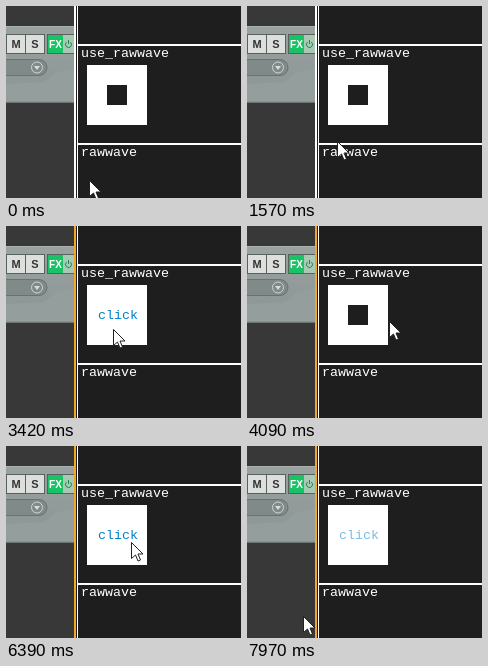
An HTML page with a canvas for the animation above (7.99 s loop, 235 by 192 pixels).

```html
<!DOCTYPE html>
<html lang="en">
<head>
<meta charset="utf-8">
<title>Toggle button</title>
<style>
  html, body { margin: 0; width: 235px; height: 192px; overflow: hidden; background: #1e1e1e; }
  canvas { display: block; }
</style>
</head>
<body>
<canvas id="stage" width="235" height="192"></canvas>
<script>
const ctx = document.getElementById('stage').getContext('2d');
const LOOP = 7990, DARK = '#1e1e1e', BLUE = [0, 128, 200];
const MONO = '13.33px "Liberation Mono", monospace';
const SANS = '"Liberation Sans", sans-serif';

// Pointer tip: time, x, y
const path = [
  [30, 83, 174], [430, 136, 110], [1110, 136, 110], [1570, 90, 135], [1670, 90, 135],
  [1900, 90, 141], [2100, 107, 103], [3440, 107, 103], [3760, 176, 97], [3880, 176, 97],
  [4210, 128, 94], [4930, 128, 94], [5210, 180, 105], [5390, 180, 105], [5810, 125, 96],
  [6700, 125, 96], [7050, 176, 93], [7250, 176, 92], [7460, 161, 92], [7560, 161, 92],
  [7970, 56, 170]
];
const enters = [390, 1950, 4230, 5620, 7620];
const leaves = [1230, 3540, 5000, 6790, 7885];
const clicks = [2390, 3070, 4670, 6230];
const holds = [[470, 570], [1570, 1670]];

const clamp = v => Math.max(0, Math.min(1, v));
const mix = (a, b, k) => a + (b - a) * k;
const blend = (a, b, k) => `rgb(${a.map((v, i) => Math.round(mix(v, b[i], k)))})`;
const last = (times, t) => times.filter(v => v <= t).pop() ?? -1e4;

function rect(x, y, w, h, color) {
  ctx.fillStyle = color;
  ctx.fillRect(x, y, w, h);
}

function text(s, x, y, color, font = MONO, align = 'left') {
  ctx.font = font;
  ctx.textAlign = align;
  ctx.fillStyle = color;
  ctx.fillText(s, x, y);
}

function shape(points, fill) {
  ctx.beginPath();
  points.forEach(([x, y]) => ctx.lineTo(x, y));
  ctx.closePath();
  ctx.fillStyle = fill;
  ctx.fill();
}

function centred(size, color, hole = 0) {
  ctx.beginPath();
  for (const s of [size, Math.min(hole, size)]) ctx.rect(111 - s / 2, 89 - s / 2, s, s);
  ctx.fillStyle = color;
  ctx.fill('evenodd');
}

function pointer(t) {
  let i = path.findIndex(k => k[0] > t);
  if (i < 1) return path[i < 0 ? path.length - 1 : 0].slice(1);
  const [a, b] = [path[i - 1], path[i]];
  const k = clamp((t - a[0]) / (b[0] - a[0])), e = k * k * (3 - 2 * k);
  return [mix(a[1], b[1], e), mix(a[2], b[2], e)];
}

function trackPanel() {
  rect(0, 0, 68, 192, '#383838');
  const g = ctx.createLinearGradient(0, 20, 0, 97);
  g.addColorStop(0, '#9aa3a1');
  g.addColorStop(1, '#8a9492');
  rect(0, 20, 68, 77, g);
  rect(0, 20, 68, 1, '#aab2b0');
  shape([[0, 78], [38, 76], [50, 66], [68, 62], [68, 95], [0, 95]], '#949e9c');
  rect(0, 96, 68, 1, '#6c7573');

  ctx.beginPath();
  ctx.roundRect(-20, 53.5, 61, 16, 8);
  ctx.fillStyle = '#808a88';
  ctx.strokeStyle = '#69726f';
  ctx.fill();
  ctx.stroke();
  ctx.beginPath();
  ctx.arc(31, 61.5, 5.5, 0, 7);
  ctx.strokeStyle = '#cfd5d3';
  ctx.stroke();
  shape([[28, 60], [34, 60], [31, 64]], '#d8dddb');

  rect(0, 28, 39, 20, '#59615f');
  ['M', 'S'].forEach((s, i) => {
    rect(1 + i * 19, 29, 18, 18, '#dddfdc');
    text(s, 10 + i * 19, 42, '#333', `bold 11px ${SANS}`, 'center');
  });
  rect(41, 28, 27, 20, '#59615f');
  rect(42, 29, 15, 18, '#18c265');
  text('FX', 49.5, 42, '#fff', `bold 10px ${SANS}`, 'center');
  rect(57, 29, 11, 18, '#a9c9b5');
  ctx.strokeStyle = '#168a4c';
  ctx.beginPath();
  ctx.arc(62.5, 38.5, 3, -0.9, 4.05);
  ctx.moveTo(62.5, 34);
  ctx.lineTo(62.5, 38);
  ctx.stroke();
}

function toggle(t) {
  const enter = last(enters, t), leave = last(leaves, t), click = last(clicks, t);
  const hover = enter > leave;
  const on = clicks.filter(v => v <= t).length % 2 === 1;
  const p = clamp((t - enter) / 220), q = clamp((t - leave) / 320);
  const k = clamp((t - click) / 110);

  rect(81, 59, 60, 60, '#fff');
  ctx.globalAlpha = hover ? p : clamp(1 - q * 1.8);
  text('click', 92, 93, on ? '#58809a' : blend([110, 110, 110], BLUE, clamp(p * 2 - 0.8)));
  ctx.globalAlpha = 1;

  if (on) centred(30, blend(BLUE, BLUE, 1), 30 * (1 - k));
  else if (k < 1) centred(30, blend(BLUE, BLUE, 1), 30 * k);
  else if (!hover) centred(20 * clamp(q * 2 - 1), DARK);
  else if (p < 1) {
    centred(20 + 10 * clamp(p * 2.2), blend([30, 30, 30], BLUE, clamp(p * 4)), 30 * clamp((p - 0.2) / 0.8));
  }
}

function cursor(t) {
  const [x, y] = pointer(t).map(Math.round);
  const outline = [[0, 0], [0, 16], [4, 12.5], [6.5, 18.5], [9, 17.5], [6.5, 11.5], [11.5, 11.5]];
  shape(outline.map(([a, b]) => [x + a + 0.5, y + b + 0.5]), '#fff');
  ctx.strokeStyle = '#222';
  ctx.stroke();
}

function draw(t) {
  for (const [from, to] of holds) if (t >= from && t < to) t = from;
  rect(0, 0, 235, 192, DARK);
  trackPanel();
  rect(68, 0, 2, 192, t < 2390 ? '#fff' : '#f5a623');
  rect(71, 0, 1, 192, '#fff');
  rect(72, 38, 163, 2, '#fff');
  rect(72, 137, 163, 2, '#fff');
  text('use_rawwave', 75, 51, '#fff');
  text('rawwave', 75, 150, '#fff');
  toggle(t);
  cursor(t);
}

const start = performance.now();
function frame() {
  draw((performance.now() - start) % LOOP);
  requestAnimationFrame(frame);
}
frame();
</script>
</body>
</html>
```
